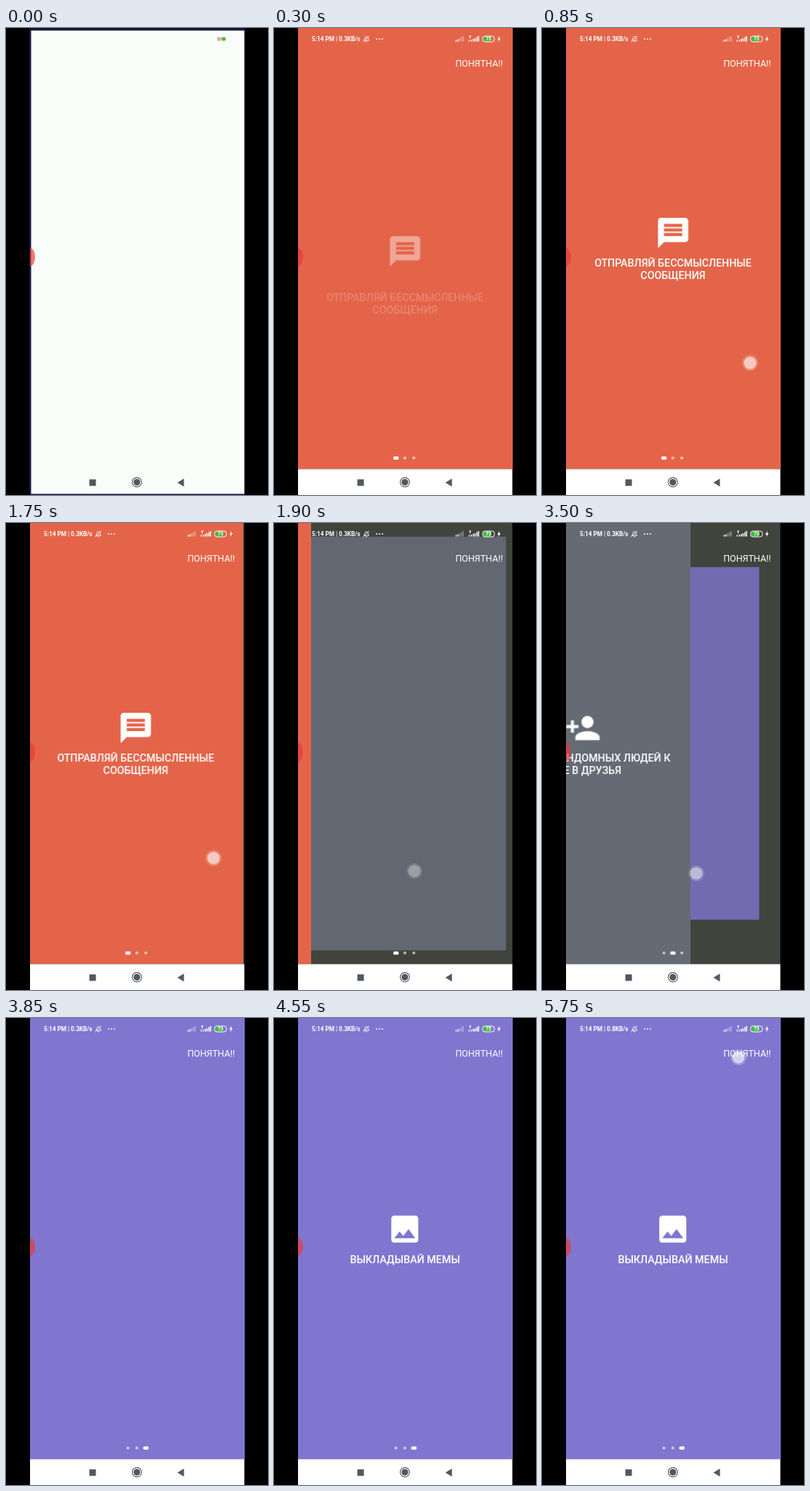
An HTML page that plays this animation: 360 px wide and 640 px high, repeating every 6.6 s.

```html
<!DOCTYPE html>
<html lang="ru">
<head>
<meta charset="utf-8">
<title>Onboarding</title>
<style>
html, body { margin: 0; width: 100%; height: 100%; overflow: hidden; background: #000; }
svg { display: block; width: 360px; height: 640px; font-family: Roboto, sans-serif; }

/* Every track shares one 6600 ms loop: 1% = 66 ms */
.page, .icon, .title, .touch, .active, .cover, .rate { animation: 6600ms linear infinite backwards; }

.page { transform-origin: 180.5px 302px; }
.p1 { animation-name: page1; }
.p2 { animation-name: page2; }
.p3 { animation-name: page3; }
@keyframes page1 {
  0%, 26.515% { transform: none; }
  27.273% { transform: translateX(-90px); }
  28.03% { transform: translateX(-200px); }
  28.788% { transform: translateX(-277px); }
  29.545% { transform: translateX(-290px); }
  30.303%, 100% { transform: translateX(-296px); }
}
@keyframes page2 {
  0%, 28.42% { transform: translateX(0) scale(.8); opacity: .8; }
  28.788% { transform: translateX(0) scale(.937); opacity: .937; }
  29.545% { transform: translateX(0) scale(.983); opacity: .983; }
  30.303%, 51.515% { transform: translateX(0) scale(1); opacity: 1; }
  52.273% { transform: translateX(-35px) scale(1); }
  53.03% { transform: translateX(-122px) scale(1); }
  53.788% { transform: translateX(-215px) scale(1); }
  54.545% { transform: translateX(-262px) scale(1); }
  55.303% { transform: translateX(-283px) scale(1); }
  56.061% { transform: translateX(-292px) scale(1); }
  56.818%, 100% { transform: translateX(-296px) scale(1); opacity: 1; }
}
@keyframes page3 {
  0%, 51.4% { transform: scale(.8); opacity: 0; }
  51.41%, 54.12% { transform: scale(.8); opacity: .8; }
  54.545% { transform: scale(.888); opacity: .888; }
  55.303% { transform: scale(.959); opacity: .959; }
  56.061% { transform: scale(.99); opacity: .99; }
  56.818%, 100% { transform: none; opacity: 1; }
}

/* Page content rises and fades in, started by the page's own delay */
.p1 { --start: 250ms; }
.p2 { --start: 2400ms; }
.p3 { --start: 4050ms; }
.icon { animation-name: icon; animation-delay: var(--start); }
.title { animation-name: title; animation-delay: var(--start); }
@keyframes icon {
  0% { transform: translateY(44px); opacity: 0; animation-timing-function: cubic-bezier(.33, 1, .68, 1); }
  4.545%, 39% { transform: none; opacity: 1; }
  39.01%, 100% { transform: translateY(44px); opacity: 0; }
}
@keyframes title {
  0% { transform: translateY(60px); opacity: 0; animation-timing-function: cubic-bezier(.5, 1, .89, 1); }
  6.818%, 39% { transform: none; opacity: 1; }
  39.01%, 100% { transform: translateY(60px); opacity: 0; }
}
.title { font-size: 14.25px; font-weight: 500; text-anchor: middle; }

.touch { animation-name: touch; }
@keyframes touch {
  0%, 11.3% { transform: translate(286px, 459px); opacity: 0; }
  12.8%, 26.515% { transform: translate(286px, 459px); opacity: 1; }
  28.03% { transform: translate(205px, 475px); opacity: .9; }
  28.788% { transform: translate(193px, 477px); opacity: .55; }
  31.061% { transform: translate(193px, 477px); opacity: 0; }
  51.515% { transform: translate(290px, 466px); opacity: 0; }
  52.273% { transform: translate(262px, 472px); opacity: .8; }
  53.03% { transform: translate(212.5px, 480px); opacity: .8; }
  53.788% { transform: translate(190px, 482px); opacity: .6; }
  55.303% { transform: translate(190px, 482px); opacity: 0; }
  55.31%, 83.2% { transform: translate(270px, 54px); opacity: 0; }
  86.364%, 100% { transform: translate(270px, 54px); opacity: 1; }
}

.active { animation-name: active; }
@keyframes active {
  0%, 29.545% { transform: none; }
  31.061%, 55.303% { transform: translateX(12.3px); }
  56.818%, 100% { transform: translateX(24.6px); }
}

.cover { animation-name: cover; }
@keyframes cover {
  0%, .75% { opacity: 1; }
  3.03%, 100% { opacity: 0; }
}

.status { font-size: 8.2px; font-weight: 700; }
.rate { animation-name: slow; }
.rate.fast { animation-name: fast; }
@keyframes slow { 0%, 71.96% { opacity: 1; } 71.97%, 100% { opacity: 0; } }
@keyframes fast { 0%, 71.96% { opacity: 0; } 71.97%, 100% { opacity: 1; } }
</style>
</head>
<body>
<svg viewBox="0 0 360 640">
  <defs>
    <clipPath id="screen"><path d="M33 0h294.5v640H33z"/></clipPath>
    <clipPath id="pager"><path d="M33 0h294.5v604.5H33z"/></clipPath>
  </defs>
  <path d="M0 0h360v640H0z"/>

  <g clip-path="url(#pager)" fill="#fff">
    <path d="M33 0h295v605H33z" fill="#40443d"/>
    <g class="page p3">
      <path d="M33 0h295v604.5H33z" fill="#8076d0"/>
      <g transform="translate(0 8.3)">
        <g class="icon"><path transform="translate(155 256.3) scale(2.06)" d="M21 19V5c0-1.1-.9-2-2-2H5c-1.1 0-2 .9-2 2v14c0 1.1.9 2 2 2h14c1.1 0 2-.9 2-2zM8.5 13.5l2.5 3.01L14.5 12l4.5 6H5z"/></g>
        <text class="title" x="180" y="327.3">ВЫКЛАДЫВАЙ МЕМЫ</text>
      </g>
    </g>
    <g class="page p2">
      <path d="M33 0h295v604.5H33z" fill="#646b75"/>
      <g class="icon"><path transform="translate(155.2 256) scale(2.08)" d="M15 12c2.21 0 4-1.79 4-4s-1.79-4-4-4-4 1.79-4 4 1.79 4 4 4zm-9-2V7H4v3H1v2h3v3h2v-3h3v-2H6zm9 4c-2.67 0-8 1.34-8 4v2h16v-2c0-2.66-5.33-4-8-4z"/></g>
      <text class="title"><tspan x="180" y="327">ДОБАВЛЯЙ РАНДОМНЫХ ЛЮДЕЙ К</tspan><tspan x="180" y="343.6">СЕБЕ В ДРУЗЬЯ</tspan></text>
    </g>
    <g class="page p1">
      <path d="M33 0h295v604.5H33z" fill="#e46449"/>
      <g class="icon"><path transform="translate(155.2 256) scale(2.08)" d="M20 2H4c-1.1 0-2 .9-2 2v18l4-4h14c1.1 0 2-.9 2-2V4c0-1.1-.9-2-2-2zm-2 12H6v-2h12v2zm0-3H6V9h12v2zm0-3H6V6h12v2z"/></g>
      <text class="title"><tspan x="180" y="327">ОТПРАВЛЯЙ БЕССМЫСЛЕННЫЕ</tspan><tspan x="180" y="343.6">СООБЩЕНИЯ</tspan></text>
    </g>

    <text x="314.5" y="53" font-size="12.5" text-anchor="end">ПОНЯТНА!!</text>
    <g opacity=".6"><circle cx="167.5" cy="589.3" r="2"/><circle cx="179.8" cy="589.3" r="2"/><circle cx="192.1" cy="589.3" r="2"/></g>
    <rect class="active" x="164" y="587.2" width="7.2" height="4.2" rx="1.2"/>
  </g>

  <!-- status bar -->
  <g class="status" fill="#fff">
    <text class="rate" x="52" y="18">5:14 PM | 0.3KB/s</text>
    <text class="rate fast" x="52" y="18">5:14 PM | 0.8KB/s</text>
    <path d="M123.5 17.2c1.5-1 1-5.700 3.500-5.700s2 4.700 3.500 5.700zM126 18.800h2M122.500 19l8.500-8" fill="none" stroke="#fff" stroke-width=".9"/>
    <circle cx="141" cy="15" r="1"/><circle cx="145" cy="15" r="1"/><circle cx="149" cy="15" r="1"/>
    <path d="M249.500 18.500v-2h1.500v2zm2.400 0v-3h1.500v3z"/>
    <path d="M254.300 18.500v-4.500h1.500v4.500zm2.400 0v-6h1.500v6zm2.300 0v-7.500h1.500v7.500z" opacity=".4"/>
    <path d="M268 10.500h3v1h-1v3h-1v-3h-1zM267.500 18.500v-2h1.500v2zm3 0v-2.500h1.500v2.500zm2.500 0v-3.500h1.500v3.500zm2.500 0v-4.500h1.500v4.500zm2.500 0v-6h1.500v6zm2.300 0v-7.500h1.500v7.500z"/>
    <rect x="287" y="11.500" width="12" height="7" rx="3" fill="#45b83f"/>
    <rect x="286.500" y="11" width="16.500" height="8" rx="3.500" fill="none" stroke="#fff"/>
    <text x="294.700" y="17.400" font-size="6.500" text-anchor="middle">75</text>
    <path d="M310 10.800l-3.200 4.900h2l-.8 3.500 3.500-5h-2z"/>
  </g>

  <path d="M33 604.500h294.500v35.500H33z" fill="#fff"/>

  <g class="cover">
    <path d="M32 0h296v640H32z" fill="#15153f"/>
    <path d="M34.500 3.500h293v635h-293z" fill="#f8fdf9"/>
    <path d="M291.500 12.500v5M294 12.500v5" stroke="#e04a35" stroke-width="1.200"/>
    <rect x="296" y="12.500" width="6" height="5" rx="2" fill="#55b83f"/>
  </g>

  <ellipse cx="33" cy="314" rx="7" ry="12.500" fill="#e6393c" opacity=".68" clip-path="url(#screen)"/>

  <!-- navigation buttons -->
  <g fill="#55585a">
    <path d="M114.500 618.500h9v9h-9zM244.500 617.500v11l-9-5.500z"/>
    <circle cx="179.800" cy="622.500" r="4.600"/>
    <circle cx="179.800" cy="622.500" r="6.400" fill="none" stroke="#55585a" stroke-width="1.100"/>
  </g>

  <g class="touch" fill="#fff">
    <circle r="11" opacity=".2"/>
    <circle r="8.600" opacity=".58"/>
  </g>
</svg>
</body>
</html>
```
